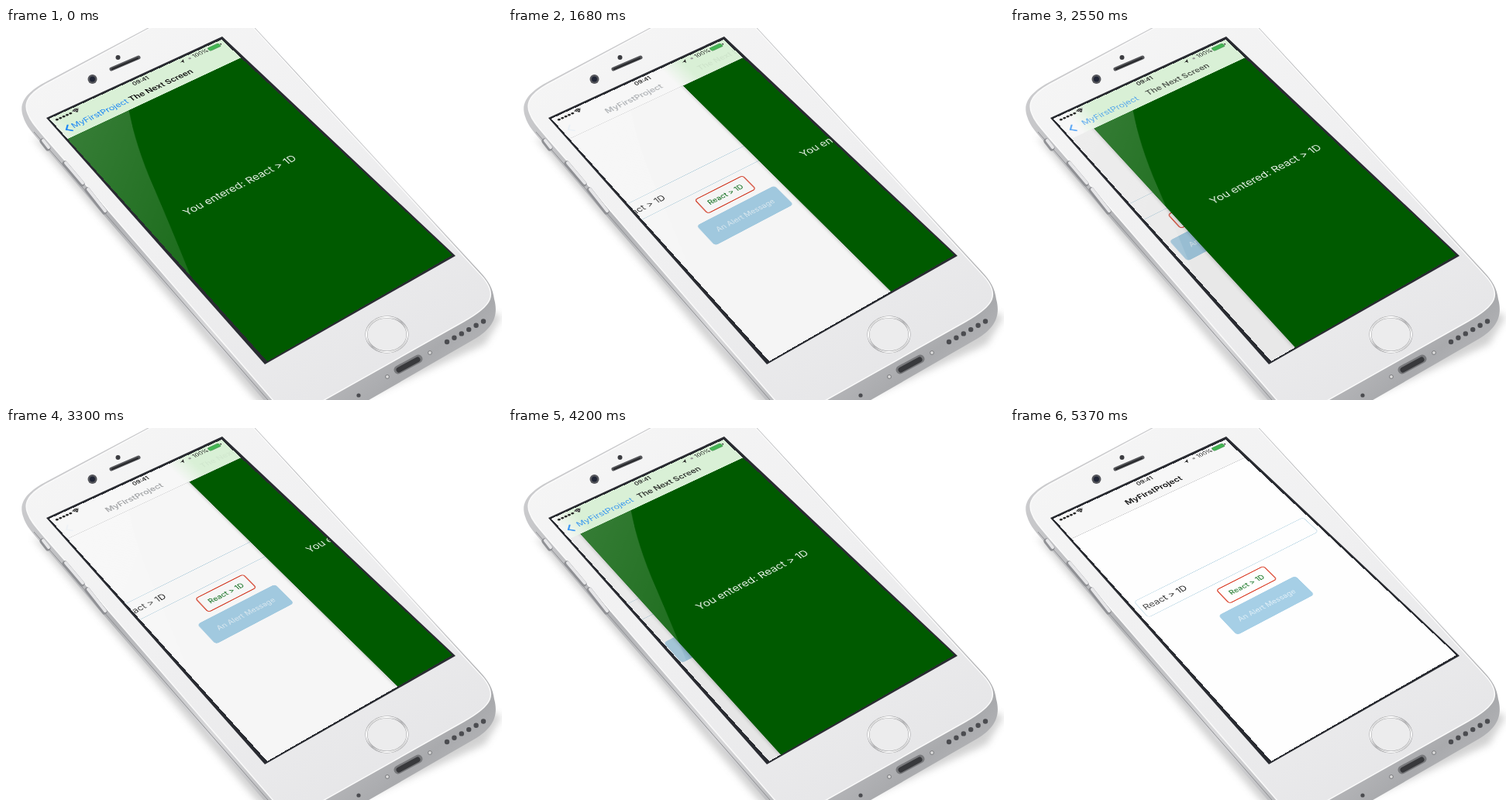
Write an HTML page that moves like this. It is 640 px wide and 480 px high and loops after 5400 ms.

```html
<!DOCTYPE html>
<html lang="en">
<head>
<meta charset="utf-8">
<title>Swipe back</title>
<style>
html, body { margin: 0; width: 100%; height: 100%; overflow: hidden; background: #fff; }
#stage { position: relative; width: 640px; height: 480px; overflow: hidden; }
#phone { position: absolute; left: 0; top: 0; }
#screen {
  position: absolute; left: 0; top: 0; width: 375px; height: 667px;
  transform-origin: 0 0; overflow: hidden; background: #fff;
  font: 17px/1 Inter, "Liberation Sans", sans-serif; white-space: nowrap;
}
#screen div, #screen svg { position: absolute; box-sizing: border-box; }
.page { left: 0; top: 0; width: 375px; height: 667px; }
#home { background: #fefefe; }
.field { left: 8px; top: 257px; width: 359px; height: 46px; padding-left: 5px; border: 1px solid #b4d3e2; border-radius: 6px; color: #222; line-height: 44px; }
.label { left: 137px; top: 315px; width: 101px; height: 41px; border: 2px solid #dc4a35; border-radius: 6px; color: #1f7a2c; font-size: 14px; font-weight: 500; line-height: 37px; text-align: center; }
.button { left: 107px; top: 367px; width: 161px; height: 55px; border-radius: 6px; background: #a6cfe6; color: #e2f0f8; font-size: 14px; line-height: 55px; text-align: center; }
#dim { background: #000; }
#next { background: #005a00; box-shadow: 0 0 7px rgba(0,0,0,.3); }
.message { left: 0; top: 324px; width: 369px; text-align: center; font-size: 20.5px; color: #e8f2e8; }
#nav { left: 0; top: 0; width: 375px; height: 64px; background: #f7f7f7; overflow: hidden; }
#tint { left: 0; top: 0; width: 800px; height: 64px; background: linear-gradient(90deg, rgba(214,239,211,0), #d9f0d6 44px); }
#nav .text { top: 33px; }
.title { font-weight: 600; color: #111; transform: translateX(-50%); }
#back { left: 23px; color: #1684f5; }
#line { left: 0; bottom: 0; width: 375px; height: 1px; background: #c4c4c6; }
</style>
</head>
<body>
<div id="stage">
  <svg id="phone" width="640" height="480">
    <defs>
      <linearGradient id="metal" x2="1" y2="1">
        <stop offset="0" stop-color="#d4d4d6"/><stop offset=".35" stop-color="#b3b4b7"/>
        <stop offset=".6" stop-color="#d8d8da"/><stop offset=".85" stop-color="#a9aaad"/>
        <stop offset="1" stop-color="#c9c9cc"/>
      </linearGradient>
      <linearGradient id="face" x2=".8" y2="1">
        <stop offset="0" stop-color="#f6f6f6"/><stop offset=".5" stop-color="#f0f0f1"/>
        <stop offset="1" stop-color="#e5e5e7"/>
      </linearGradient>
      <linearGradient id="ring" x2="1" y2="1">
        <stop offset="0" stop-color="#aaa"/><stop offset=".25" stop-color="#fff"/>
        <stop offset=".5" stop-color="#b5b5b7"/><stop offset=".75" stop-color="#fafafa"/>
        <stop offset="1" stop-color="#a6a6a8"/>
      </linearGradient>
      <filter id="soft"><feGaussianBlur stdDeviation="5"/></filter>
    </defs>
    <path d="M34 140L330 488H440L618 408L640 372" fill="#999" opacity=".45" filter="url(#soft)"/>
    <path d="M190-4L58 66C30 80 15 94 22 114C26 127 34 135 47 150L336 484L430 502L600 404C628 389 636 372 630 350C628 335 622 326 612 315L318-4Z" fill="url(#metal)"/>
    <path d="M190-2L60 68C34 81 21 93 28 110C32 121 40 129 50 141L346 482H407L590 379C626 359 638 344 610 316L316-4Z" fill="url(#face)" stroke="#fafafa" stroke-width="1.5"/>
    <path d="M36 134L338 480" stroke="#8f9093" fill="none"/>
    <g stroke-linecap="round" fill="none">
      <path d="M47 146L54 155M76 175L98 201M105 209L127 237" stroke="#909195" stroke-width="7"/>
      <path d="M48 145L55 154M77 174L99 200M106 208L128 236" stroke="#e6e6e8" stroke-width="4"/>
      <path d="M136 53L171 38" stroke="#55565a" stroke-width="5"/>
      <path d="M137 53L170 39" stroke="#292a2d" stroke-width="2"/>
      <path d="M506 441L532 427" stroke="#77787b" stroke-width="11"/>
      <path d="M507 441L531 428" stroke="#38393c" stroke-width="7"/>
    </g>
    <circle cx="111.500" cy="66" r="6" fill="#55565b"/><circle cx="111.500" cy="66" r="3.500" fill="#202535"/>
    <circle cx="144.500" cy="38" r="3" fill="#3b3c40"/>
    <g id="holes" fill="#4b4c50"></g>
    <ellipse cx="491.500" cy="395.500" rx="26.500" ry="22.500" fill="#ececed" stroke="#8d8d90" stroke-width="3"/>
    <ellipse cx="491.500" cy="395.500" rx="26.500" ry="22.500" fill="none" stroke="url(#ring)" stroke-width="2.400"/>
    <path d="M52 116L279 11L580 294L334 434Z" fill="#292b31"/>
  </svg>

  <div id="screen">
    <div id="home" class="page">
      <div class="field">React &gt; 1D</div>
      <div class="label">React &gt; 1D</div>
      <div class="button">An Alert Message</div>
    </div>
    <div id="dim" class="page"></div>
    <div id="next" class="page"><div class="message">You entered: React &gt; 1D</div></div>
    <svg class="page" width="375" height="667">
      <linearGradient id="glare" x2=".3" y2="1">
        <stop offset="0" stop-color="#fff" stop-opacity=".23"/>
        <stop offset="1" stop-color="#fff" stop-opacity=".1"/>
      </linearGradient>
      <path d="M0 0H150L128 64Q88 150 60 251Q32 350 0 455Z" fill="url(#glare)"/>
    </svg>
    <div id="nav">
      <div id="tint"></div>
      <div id="line"></div>
      <svg id="chevron" width="30" height="64"><path d="M19 32.500L10.500 42L19 51.500" fill="none" stroke="#1684f5" stroke-width="3"/></svg>
      <div id="back" class="text">MyFirstProject</div>
      <div id="homeTitle" class="text title">MyFirstProject</div>
      <div id="nextTitle" class="text title">The Next Screen</div>
      <svg width="375" height="20" fill="#222">
        <g id="signal"></g>
        <path d="M43 7Q50 1 57 7L50 15Z"/>
        <path d="M43 9.500Q50 4 57 9.500M45 12Q50 8 55 12" fill="none" stroke="#f4f4f4"/>
        <text x="187.500" y="14.500" text-anchor="middle" font-size="12.500" font-weight="600">09:41</text>
        <path d="M275 10L285 5L280 15V10Z"/>
        <circle cx="296" cy="10" r="2.500" fill="#999"/>
        <text x="304" y="14" font-size="12.500">100%</text>
        <rect x="339" y="5" width="25" height="10" rx="2.500" fill="#43b552" stroke="#51885a"/>
        <rect x="366" y="8" width="2" height="4"/>
      </svg>
    </div>
  </div>
</div>
<script>
const $ = id => document.getElementById(id);
const LOOP = 5400, STEP = 30, WIDTH = 375, HEIGHT = 667;

// Finger drag: time in ms, distance of the upper page from the left in points.
const drag = [
  [600, 0], [810, 345], [1060, 90], [1140, 110], [1420, 165], [1600, 198],
  [1680, 241], [1710, 266], [1770, 291], [2280, 20], [2390, 10], [2550, 46],
  [2850, 191], [3090, 353], [3300, 259], [3420, 134], [3550, 36], [3760, 345],
  [3990, 130], [4200, 22], [4250, 13], [4560, 178], [4800, 328], [4980, 369], [5130, 375]
];
const rates = drag.slice(1).map(([t, x], i) => (x - drag[i][1]) / (t - drag[i][0]));
const slopes = drag.map((_, i) => {
  const a = rates[i - 1], b = rates[i];
  return a * b > 0 ? 2 * a * b / (a + b) : 0;
});

// Monotone cubic interpolation.
function dragAt(t) {
  if (t <= drag[0][0]) return 0;
  const i = drag.findIndex(point => point[0] >= t) - 1;
  if (i < 0) return WIDTH;
  const [t0, x0] = drag[i], [t1, x1] = drag[i + 1], span = t1 - t0, s = (t - t0) / span;
  const ease = s * s * (3 - 2 * s);
  return x0 + (x1 - x0) * ease
    + span * s * (1 - s) * ((1 - s) * slopes[i] - s * slopes[i + 1]);
}

// Matrix that maps a w by h rectangle onto four corners, clockwise from top left.
function perspective(w, h, [[x0, y0], [x1, y1], [x2, y2], [x3, y3]]) {
  const sx = x0 - x1 + x2 - x3, sy = y0 - y1 + y2 - y3;
  const ax = x1 - x2, ay = y1 - y2, bx = x3 - x2, by = y3 - y2;
  const det = ax * by - bx * ay;
  const g = (sx * by - bx * sy) / det, k = (ax * sy - sx * ay) / det;
  return `matrix3d(${[
    (x1 - x0 + g * x1) / w, (y1 - y0 + g * y1) / w, 0, g / w,
    (x3 - x0 + k * x3) / h, (y3 - y0 + k * y3) / h, 0, k / h,
    0, 0, 1, 0, x0, y0, 0, 1
  ].map(n => n.toFixed(9))})`;
}

const dot = (x, y, r, fill = "") => `<circle cx="${x}" cy="${y}" r="${r}" ${fill}/>`;
const grey = 'fill="#ddd" stroke="#77787b"';
$("holes").innerHTML = [0, 1, 2, 3, 4, 5].map(i => dot(569 + i * 9.4, 405 - i * 5.3, 3.2)).join("")
  + dot(492, 450, 2.4, grey) + dot(547, 419, 2.4, grey) + dot(455, 474, 2.6);
$("signal").innerHTML = [0, 1, 2, 3, 4].map(i => dot(10 + i * 7, 10, 2.7)).join("");
$("screen").style.transform = perspective(WIDTH, HEIGHT, [[56, 117], [278, 15], [576, 293], [337, 430]]);

function draw(t) {
  const x = dragAt(t), p = x / WIDTH;
  const leaving = (1 - p) ** 3, arriving = p ** 3;
  $("home").style.transform = `translateX(${-112.5 * (1 - p)}px)`;
  $("dim").style.opacity = 0.1 * (1 - p);
  $("next").style.transform = `translateX(${x}px)`;
  $("next").style.visibility = p < 1 ? "visible" : "hidden";
  $("tint").style.transform = `translateX(${x - 24 + 24 * p}px)`;
  $("line").style.opacity = p;
  $("chevron").style.opacity = $("back").style.opacity = $("nextTitle").style.opacity = leaving;
  $("back").style.transform = `translateX(${105 * p}px)`;
  $("homeTitle").style.left = 80 + 107.5 * p + "px";
  $("homeTitle").style.opacity = arriving;
  $("nextTitle").style.left = 212 + 227 * p + "px";
}

function tick() {
  draw(Math.floor(performance.now() % LOOP / STEP) * STEP);
  requestAnimationFrame(tick);
}
tick();
</script>
</body>
</html>
```
